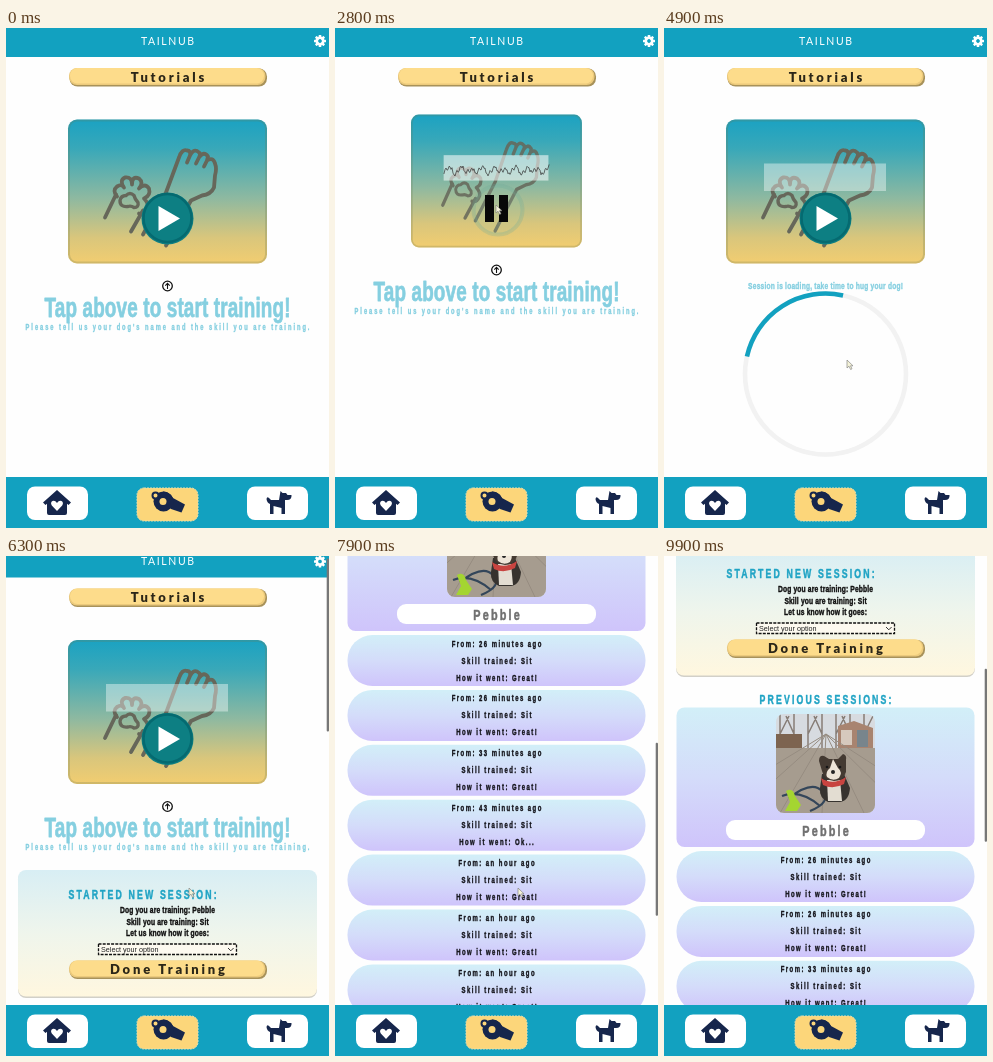
An HTML page for the animation above (10 s loop, 323 by 500 pixels).

```html
<!DOCTYPE html>
<html lang="en">
<head>
<meta charset="utf-8">
<title>Dog training</title>
<style>
html, body { margin: 0; width: 100%; height: 100%; overflow: hidden; background: #fefefe; }
svg { display: block; width: 323px; height: 500px; }
.narrow { font-family: "Liberation Sans", Arial, sans-serif; font-weight: 700; stroke-linejoin: round; }
.wide { font-family: Lato, sans-serif; font-weight: 900; }
.line { fill: none; stroke-linecap: round; stroke-linejoin: round; }
</style>
</head>
<body>
<svg id="stage" viewBox="0 0 323 500"></svg>
<script>
const LOOP = 10000, STEP = 100;
const TEAL = '#12a1c0', NAVY = '#16264c', PALE = '#85cfe0', YELLOW = '#fcd67a', PET = 'Pebble';
const REC_START = 1300, REC_END = 3900, LOAD_START = 3990, LOAD_END = 5600;

// [time, scroll offset]
const SCROLL = [[6200, 0], [6300, 7.5], [6600, 50], [7000, 260], [7400, 460],
  [7700, 530], [7900, 544.5], [8100, 540], [8500, 410], [8900, 305.5], [9200, 305.5], [9900, 328.5]];
const CURSOR_X = [[1000, 230], [1300, 161], [3900, 161], [4300, 183]];
const CURSOR_Y = [[1000, 270], [1300, 177], [3900, 177], [4300, 332]];

const rect = (x, y, w, h, r, fill, more = '') =>
  `<rect x="${x}" y="${y}" width="${w}" height="${h}" rx="${r}" fill="${fill}" ${more}/>`;
const circle = (x, y, r, fill, more = '') =>
  `<circle cx="${x}" cy="${y}" r="${r}" fill="${fill}" ${more}/>`;
const path = (d, fill, more = '') => `<path d="${d}" fill="${fill}" ${more}/>`;
const gradient = (id, ...stops) =>
  `<linearGradient id="${id}" x2="0" y2="1">${stops.map(([at, c]) =>
    `<stop offset="${at}" stop-color="${c}"/>`).join('')}</linearGradient>`;

// Condensed display face, centred on x and thickened with a thin outline
function narrow(text, y, size, gap, fill, x = 161.5) {
  const k = 0.7;
  return `<text class="narrow" transform="translate(${x + gap * k / 2} ${y}) scale(${k} 1)" text-anchor="middle"
    font-size="${size}" letter-spacing="${gap}" fill="${fill}" stroke="${fill}" stroke-width="${0.25 + size / 50}">${text}</text>`;
}
function wide(text, y, size, gap, fill, weight = 900) {
  return `<text class="wide" x="${161.5 + gap / 2}" y="${y}" text-anchor="middle" font-size="${size}"
    letter-spacing="${gap}" fill="${fill}" style="font-weight:${weight}">${text}</text>`;
}
const button = (label, y) =>
  rect(63.5, y + 0.5, 197.5, 18, 8, '#a8925a') + rect(63, y, 196.5, 17, 8, '#ecca7c') +
  rect(64, y, 194, 15.5, 7.5, '#fddc8b') + wide(label, y + 13.5, 13, 2.8, '#2b2618');

function gear(x, y) {
  let teeth = '';
  for (let a = 0; a < 360; a += 45)
    teeth += rect(x - 1.3, y - 6, 2.6, 4, 0.6, '#fff', `transform="rotate(${a} ${x} ${y})"`);
  return teeth + circle(x, y, 3.2, 'none', 'stroke="#fff" stroke-width="2.6"');
}

function paws() {
  return `<g id="paws" class="line" stroke="#66675a" stroke-width="3.8">
    <path d="M37 98 48 75M63 112 75 91M75 115 98 73 111 38Q114 29 119 31Q123 31 122 36
      Q126 28 131 33Q133 34 131 38Q136 31 140 37L139 41Q145 37 147 44Q149 49 147 56L146 68Q143 75 134 76L123 81 98 126
      M122 36 119 43M131 38 128 44M139 41 136 47"/>
    <path d="M49 77Q44 71 49 67Q54 64 56 68Q51 61 57 58Q64 57 64 65Q64 56 71 59Q76 63 71 69Q77 63 81 69
      Q83 76 76 79Q82 85 79 90Q77 95 71 94"/>
    <path d="M52 81Q53 76 58 76Q62 72 66 76Q67 80 70 83Q71 88 66 88Q63 86 60 87Q52 88 52 81Z" stroke-width="3.4"/>
  </g>`;
}

function photo() {
  let trees = '', stones = '';
  for (let i = 0; i < 7; i++) {
    const x = 4 + i * 14;
    trees += `M${x} 34V0M${x} 20l${i % 2 ? -8 : 9} -18`;
    stones += `M50 20L${i * 42 - 80} 99`;
  }
  return `<g transform="translate(112 486.5)" clip-path="url(#frame)">
    ${rect(0, 0, 99, 99, 0, '#d7dbe0')}
    ${path(trees, 'none', 'stroke="#877d76" stroke-width="1.5"')}
    ${rect(0, 20, 26, 14, 0, '#7d6450')}${path('M62 12 78 7 97 14V36H62Z', '#a88470')}
    ${rect(65, 16, 11, 15, 0, '#d6c9bd')}${rect(81, 16, 11, 17, 0, '#78858c')}
    ${rect(0, 34, 99, 65, 0, '#a69c8f')}
    ${path(stones, 'none', 'stroke="#968c80" stroke-width="1"')}
    ${path('M13 84Q36 66 46 77T34 97M6 82Q24 75 44 92', 'none', 'stroke="#34465a" stroke-width="2.2"')}
    ${path('M10 77Q17 73 19 82L25 91 21 97H9L14 88Z', '#a4d531')}
    ${path('M46 60H68L74 74Q73 87 64 88H52Q43 84 44 74Z', '#37332f')}
    ${path('M51 66H64L66 87H52Z', '#e3ddd2')}
    ${path('M43 47Q43 41 48 42L53 45H62L67 40Q71 41 70 46L70 58Q67 67 58 67Q48 66 46 57Z', '#443a32')}
    ${path('M57 45 62 54Q67 58 63 64Q57 68 51 63Q49 58 54 54Z', '#eee5d8')}
    ${circle(57, 58, 2, '#252525')}${circle(51, 53, 1.3, '#171717')}${circle(64, 53, 1.3, '#171717')}
    ${path('M45 64Q57 72 70 63L68 70Q57 76 47 71Z', '#c84440')}
  </g>`;
}

function row(i) {
  const y = 623.5 + i * 54.9;
  const ago = ['26 minutes', '26 minutes', '33 minutes', '43 minutes'][i] || 'an hour';
  const lines = [`From: ${ago} ago`, 'Skill trained: Sit', `How it went: ${i === 3 ? 'Ok...' : 'Great!'}`];
  return rect(12.5, y, 298, 51, 25, 'url(#lilac)') +
    lines.map((s, n) => narrow(s, y + 11.5 + n * 17, 8.5, 2.1, '#15151c')).join('');
}

function sessions() {
  return rect(12, 323, 299, 126.5, 8, '#d2d0c8') + rect(12, 321.5, 299, 126.5, 8, 'url(#cream)') +
    narrow('STARTED NEW SESSION:', 350.5, 12.5, 3.05, '#1fa3c4', 136.5) +
    narrow(`Dog you are training: ${PET}`, 364.5, 9.6, 0.2, '#111') +
    narrow('Skill you are training: Sit', 376.2, 9.6, 0.2, '#111') +
    narrow('Let us know how it goes:', 387.8, 9.6, 0.2, '#111') +
    rect(92.5, 395.5, 138, 10.5, 0, '#fdfaf0', 'stroke="#111" stroke-width="1.3" stroke-dasharray="3 1.2"') +
    `<text x="95" y="403.4" font-size="7.2" fill="#222" font-family="Liberation Sans, Arial, sans-serif">Select your option</text>` +
    path('M222 399.5l2.8 2.8 2.8-2.8', 'none', 'stroke="#333"') +
    button('Done Training', 412) +
    narrow('PREVIOUS SESSIONS:', 476.5, 12.5, 3.1, '#1fa3c4') +
    rect(12.5, 480, 298, 139.5, 8, 'url(#lilac)') + photo() +
    rect(62, 592.5, 199, 20, 9, '#fff') +
    narrow(PET, 608.3, 15.5, 3.1, '#707070') +
    Array.from({ length: 9 }, (_, i) => row(i)).join('');
}

function nav() {
  const house = 'M51 462 65 474.5 62.5 477 61 475.7V485Q61 487 59 487H43Q41 487 41 485V475.7L39.5 477 37 474.5Z';
  const heart = 'M51 483 45.8 477.5Q44 474.5 46.5 473Q49 472 51 475Q53 472 55.5 473Q58 474.5 56.2 477.5Z';
  const dog = 'M260.5 471Q261 468 263 470L265 472H273L274.5 463 276.5 465H280L281.5 467H285.5Q286 472 281 472H279V486H275.5V480L267.5 478V486H264V476Q261 475 260.5 471Z';
  const spout = 'M157 463.5Q164 464 167 470L179 476.5 175.5 484.5 165 481Z';
  return rect(0, 449, 323, 51, 0, TEAL) +
    rect(21, 458.5, 61, 33.5, 8, '#fff') + rect(241, 458.5, 61, 33.5, 8, '#fff') +
    rect(131, 460, 61, 33, 7, YELLOW, 'stroke="#e6dfae" stroke-width="1" stroke-dasharray="2 1"') +
    path(house, NAVY) + path(heart, '#fff') + path(dog, NAVY) + path(spout, NAVY) +
    circle(157.5, 473.5, 10, NAVY) + circle(157, 473.5, 3.5, YELLOW) +
    circle(149.5, 467.5, 3, YELLOW, `stroke="${NAVY}" stroke-width="2"`);
}

const stage = document.getElementById('stage');
stage.innerHTML = `<defs>
  ${gradient('sunset', [0, '#1ba2c2'], [0.2, '#38a8b9'], [0.55, '#8fb9a0'], [0.82, '#d9c67c'], [1, '#f2cd70'])}
  ${gradient('cream', [0, '#d8eef4'], [0.5, '#eff5ec'], [1, '#fff7df'])}
  ${gradient('lilac', [0, '#d2eff8'], [0.5, '#d4dcfa'], [1, '#cfc4fb'])}
  <clipPath id="frame"><rect width="99" height="99" rx="8"/></clipPath></defs>
  ${rect(0, 0, 323, 500, 0, '#fefefe')}
  <g id="page">
    ${rect(0, 0, 323, 29, 0, TEAL)}
    ${wide('TAILNUB', 16.8, 10.5, 1.6, '#fff', 400)}${gear(314, 13)}
    ${button('Tutorials', 40)}
    <g id="card">
      ${rect(0, 0, 199, 144, 9, 'url(#sunset)')}
      ${rect(1, 1, 197, 142, 8, 'none', 'stroke="#6b7a50" stroke-opacity=".25" stroke-width="2"')}
      ${paws()}
      ${rect(38, 44, 122, 27.5, 0, '#fff', 'id="strip"')}
    </g>
    <path id="wave" class="line" stroke="#333" stroke-width=".7"/>
    <g id="play">${circle(161.5, 190.5, 26, '#0d7f83')}
      ${circle(161.5, 190, 24, 'none', 'stroke="#056a70" stroke-width="2.5"')}
      ${path('M152.5 178V203L174 190.5Z', '#fff')}</g>
    <g id="pause">${circle(163, 182, 24.5, '#8cc0a8', 'fill-opacity=".15" stroke="#69a996" stroke-opacity=".25" stroke-width="4"')}
      ${rect(150, 167, 9, 27, 0, '#080808')}${rect(164, 167, 9, 27, 0, '#080808')}</g>
    <g id="prompt">
      ${circle(161.5, 258, 4.8, '#fff', 'stroke="#111" stroke-width="1.3"')}
      ${path('M161.5 261V255.5M159.3 257.6l2.2-2.2 2.2 2.2', 'none', 'stroke="#111" stroke-width="1.1"')}
      ${narrow('Tap above to start training!', 288.5, 27, 0.2, PALE)}
      ${narrow("Please tell us your dog's name and the skill you are training.", 301.5, 8.2, 2.8, PALE)}
    </g>
    <g id="loader">
      ${narrow('Session is loading, take time to hug your dog!', 261, 9.5, 0.3, PALE)}
      ${circle(161.5, 346, 80.5, 'none', 'stroke="#f2f2f2" stroke-width="4.6"')}
      <path id="arc" d="M-56.9 -56.9A80.5 80.5 0 0 1 56.9 -56.9" fill="none" stroke="${TEAL}" stroke-width="4.6"/>
    </g>
    <g id="sessions">${sessions()}</g>
  </g>
  ${nav()}
  ${rect(320.7, 0, 2.3, 173, 1, '#777', 'id="thumb"')}
  ${path('M0 0V8L2 6.2 3.6 9.5 5 8.8 3.5 5.8H6Z', '#f4f2d8', 'id="cursor" stroke="#777" stroke-width=".6"')}`;

const el = Object.fromEntries([...stage.querySelectorAll('[id]')].map(n => [n.id, n]));
const show = (node, on) => node.setAttribute('visibility', on ? 'visible' : 'hidden');
const move = (node, value) => node.setAttribute('transform', value);
const clamp = v => Math.max(0, Math.min(1, v));

function track(points, t) {
  if (t <= points[0][0]) return points[0][1];
  for (let i = 1; i < points.length; i++) {
    const [t0, a] = points[i - 1], [t1, b] = points[i];
    if (t < t1) return a + (b - a) * (t - t0) / (t1 - t0);
  }
  return points[points.length - 1][1];
}

// Sawtooth beats with a sharp drop, plus a little ripple
function wavePath(t) {
  let d = '';
  for (let i = 0; i <= 105; i++) {
    const p = i + t / 25;
    const beat = (p % 11) / 11;
    const y = 146 - 8 * beat + 2 * Math.sin(p * 1.7) + 1.5 * Math.sin(p * 0.37);
    d += `${i ? 'L' : 'M'}${109 + i} ${y.toFixed(1)}`;
  }
  return d;
}

function draw(t) {
  const recording = t >= REC_START && t < REC_END;
  const loading = t >= LOAD_START && t < LOAD_END;
  const k = clamp((t - REC_START) / 200) - clamp((t - REC_END) / 200);
  const scroll = track(SCROLL, t);

  move(el.page, `translate(0 ${-scroll})`);
  move(el.card, `translate(${62 + 14 * k} ${91.5 - 5 * k}) scale(${1 - 0.141 * k} ${1 - 0.076 * k})`);
  el.paws.setAttribute('opacity', 1 - 0.15 * k);
  el.strip.setAttribute('opacity', 0.4 + 0.15 * k);
  show(el.strip, t >= REC_START);
  show(el.wave, recording);
  show(el.pause, recording);
  show(el.play, !recording);
  el.wave.setAttribute('d', wavePath(t));
  move(el.prompt, `translate(0 ${-16 * k})`);
  show(el.prompt, !loading);
  show(el.loader, loading);
  move(el.arc, `translate(161.5 346) rotate(${(t - LOAD_START) * 0.36})`);
  show(el.sessions, t >= LOAD_END);
  show(el.thumb, scroll > 0);
  move(el.thumb, `translate(0 ${scroll * 0.343})`);
  show(el.cursor, t >= 1000 && t < 8500);
  move(el.cursor, `translate(${track(CURSOR_X, t)} ${track(CURSOR_Y, t)})`);
}

function tick() {
  draw(Math.floor(performance.now() % LOOP / STEP) * STEP);
  requestAnimationFrame(tick);
}
tick();
</script>
</body>
</html>
```
